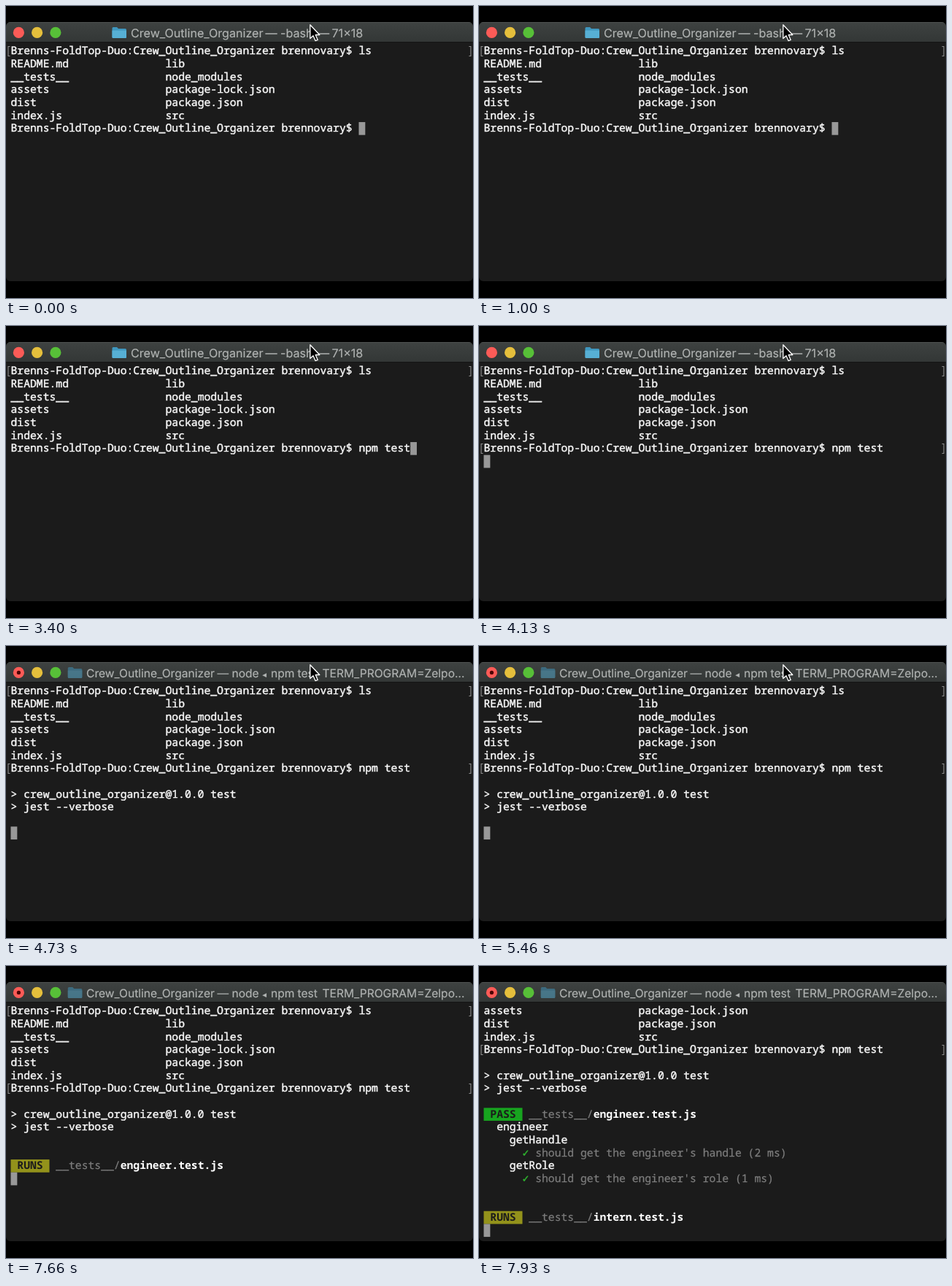
An HTML page that plays this animation: 640 px wide and 400 px high, repeating every 8 s.

```html
<!DOCTYPE html>
<html lang="en">
<head>
<meta charset="utf-8">
<title>Terminal test run</title>
<style>
  html, body { margin: 0; width: 100%; height: 100%; overflow: hidden; background: #000; }
  svg { display: block; width: 100%; height: 100%; }
  text { white-space: pre; text-rendering: geometricPrecision; }
  #screen { font: 400 14.722px "Noto Sans Mono", "DejaVu Sans Mono", monospace; }
  #screen text { fill: #f8f8f8; stroke: #f8f8f8; stroke-width: .45px; }
  #screen .bold { font-weight: 700; fill: #fff; stroke: none; }
  #screen .dim { fill: #7d7d7d; stroke: #7d7d7d; stroke-width: .25px; }
  #screen .tick { fill: #2fb52f; stroke: #2fb52f; }
  #screen .badge { font-weight: 700; fill: #1b1b1b; stroke: none; }
  #title { font-family: Inter, Roboto, sans-serif; fill: #b1b4b3; stroke: #b1b4b3; stroke-width: .15px; }
  #title .arrow { font-size: 11px; }
  .bracket { fill: none; stroke: #8f8f8f; stroke-width: 1.1; }
</style>
</head>
<body>
<svg viewBox="0 0 640 400">
  <defs>
    <linearGradient id="bar" x2="0" y2="1">
      <stop offset="0" stop-color="#3e4241"/>
      <stop offset="1" stop-color="#333736"/>
    </linearGradient>
    <clipPath id="frame"><rect y="22" width="640" height="355" rx="6"/></clipPath>
  </defs>
  <rect width="640" height="400"/>
  <g clip-path="url(#frame)">
    <rect y="22" width="640" height="355" fill="#1b1b1b"/>
    <rect y="22" width="640" height="27.5" fill="url(#bar)"/>
    <rect y="22" width="640" height="1" fill="#4e5251"/>
    <rect y="49" width="640" height="1" fill="#141414"/>
  </g>
  <circle cx="17.4" cy="36.4" r="7.6" fill="#fc5b57"/>
  <circle cx="42.6" cy="36.4" r="7.6" fill="#e5bf3c"/>
  <circle cx="67.9" cy="36.4" r="7.6" fill="#57c038"/>
  <circle id="busyDot" cx="17.4" cy="36.4" r="2.6" fill="#4d0000"/>
  <g id="folder">
    <path d="M0 2Q0 .5 1.5 .5H6.5L8.500 2.500H18Q19.500 2.500 19.500 4V14Q19.500 15.500 18 15.500H1.500Q0 15.500 0 14Z" fill="#3f97bf"/>
    <path d="M0 5H19.500V14Q19.500 15.500 18 15.500H1.500Q0 15.500 0 14Z" fill="#57b0d5"/>
  </g>
  <g id="title"></g>
  <g id="screen"></g>
  <path id="pointer" d="M416.800 25.800V44.600L421 40.700L424.100 47.700L427.200 46.400L424.200 39.500H429.800Z"
        fill="#000" stroke="#fff" stroke-width="1.300" stroke-linejoin="round"/>
</svg>
<script>
const LOOP = 8000;
const CELL = 8.833, LINE = 17.67, LEFT = 6.5, TOP = 53;
const NAME = "Crew_Outline_Organizer";
const PROMPT = `Brenns-FoldTop-Duo:${NAME} brennovary$ `;
const COMMAND = "npm test";

// When each key of the command lands
const KEYS = [1270, 1530, 1800, 2130, 2400, 2700, 2900, 3130];
const ENTER = 3800, OUTPUT = 4200, BUSY = 4460, HIDE_POINTER = 5660, RUNS = 5730, PASS = 7730;

// The long title is set slightly tighter to fit the bar
const TITLES = {
  idle: { folder: 145.5, size: 16.1,
          parts: [[171, NAME], [355.5, "—"], [376, "-bash"], [427, "—"], [446.5, "71×18"]] },
  busy: { folder: 84.8, size: 15.6,
          parts: [[110, NAME], [289.5, "—"], [309.5, "node"], [351.5, "◂", "arrow"], [363, "npm"],
                  [399.5, "test"], [433.5, "TERM_PROGRAM=Zelpo..."]] }
};

const $ = id => document.getElementById(id);
const x = col => LEFT + col * CELL;
const span = (col, text, cls = "") => ({ col, text, cls });
const prompt = (command, done) => Object.assign([span(0, PROMPT + command)], { done });
const listing = (left, right) => [span(0, left), span(24, right)];
const suite = (label, color, file) => Object.assign(
  [span(1, label, "badge"), span(7, "__tests__/", "dim"), span(17, file, "bold")], { color });
const passed = text => [span(6, "✓", "tick"), span(8, text, "dim")];

const FILES = [
  prompt("ls", true),
  listing("README.md", "lib"),
  listing("__tests__", "node_modules"),
  listing("assets", "package-lock.json"),
  listing("dist", "package.json"),
  listing("index.js", "src")
];
const SCRIPT = [
  [],
  [span(0, `> ${NAME.toLowerCase()}@1.0.0 test`)],
  [span(0, "> jest --verbose")],
  []
];
const RESULTS = [
  suite("PASS", "#17a41f", "engineer.test.js"),
  [span(2, "engineer")],
  [span(4, "getHandle")],
  passed("should get the engineer's handle (2 ms)"),
  [span(4, "getRole")],
  passed("should get the engineer's role (1 ms)")
];
const running = file => [[], suite("RUNS", "#93921b", file)];

function screenAt(t) {
  if (t < ENTER) {
    const typed = COMMAND.slice(0, KEYS.filter(k => k <= t).length);
    return { rows: [...FILES, prompt(typed, false)], cursor: [PROMPT.length + typed.length, 6] };
  }
  const rows = [...FILES, prompt(COMMAND, true)];
  if (t >= OUTPUT) rows.push(...SCRIPT);
  if (t >= PASS) rows.push(...RESULTS, [], ...running("intern.test.js"));
  else if (t >= RUNS) rows.push(...running("engineer.test.js"));
  const scrolled = rows.slice(-17);
  return { rows: scrolled, cursor: [0, scrolled.length] };
}

const textTag = (left, y, text, cls = "") =>
  `<text x="${left}" y="${y}" class="${cls}">${text}</text>`;

function drawRow(row, i) {
  const top = TOP + i * LINE;
  const badge = row.color
    ? `<rect x="${x(0)}" y="${top}" width="${6 * CELL}" height="${LINE}" fill="${row.color}"/>` : "";
  const marks = row.done
    ? `<path class="bracket" d="M5.500 ${top + 2.5}h-2.500v13h2.500M634.500 ${top + 2.5}h2.500v13h-2.500"/>` : "";
  return badge + marks + row.map(s => textTag(x(s.col), top + 13.2, s.text, s.cls)).join("");
}

function draw(t) {
  const { rows, cursor: [col, line] } = screenAt(t);
  const block = `<rect x="${x(col)}" y="${TOP + line * LINE}" width="${CELL}" height="${LINE}" fill="#989898"/>`;
  $("screen").innerHTML = rows.map(drawRow).join("") + block;

  const busy = t >= BUSY;
  const title = busy ? TITLES.busy : TITLES.idle;
  $("title").setAttribute("font-size", title.size);
  $("title").innerHTML = title.parts.map(([left, text, cls]) => textTag(left, 42.6, text, cls)).join("");
  $("folder").setAttribute("transform", `translate(${title.folder} 28.5)`);
  $("folder").setAttribute("opacity", busy ? 0.5 : 1);
  $("busyDot").setAttribute("visibility", busy ? "visible" : "hidden");
  $("pointer").setAttribute("visibility", t < HIDE_POINTER ? "visible" : "hidden");
}

const EVENTS = [...KEYS, ENTER, OUTPUT, BUSY, HIDE_POINTER, RUNS, PASS];
const start = performance.now();
let shown = -1;

function tick() {
  const t = (performance.now() - start) % LOOP;
  const step = EVENTS.filter(e => e <= t).length;
  if (step !== shown) draw(t);
  shown = step;
  requestAnimationFrame(tick);
}
tick();
</script>
</body>
</html>
```
